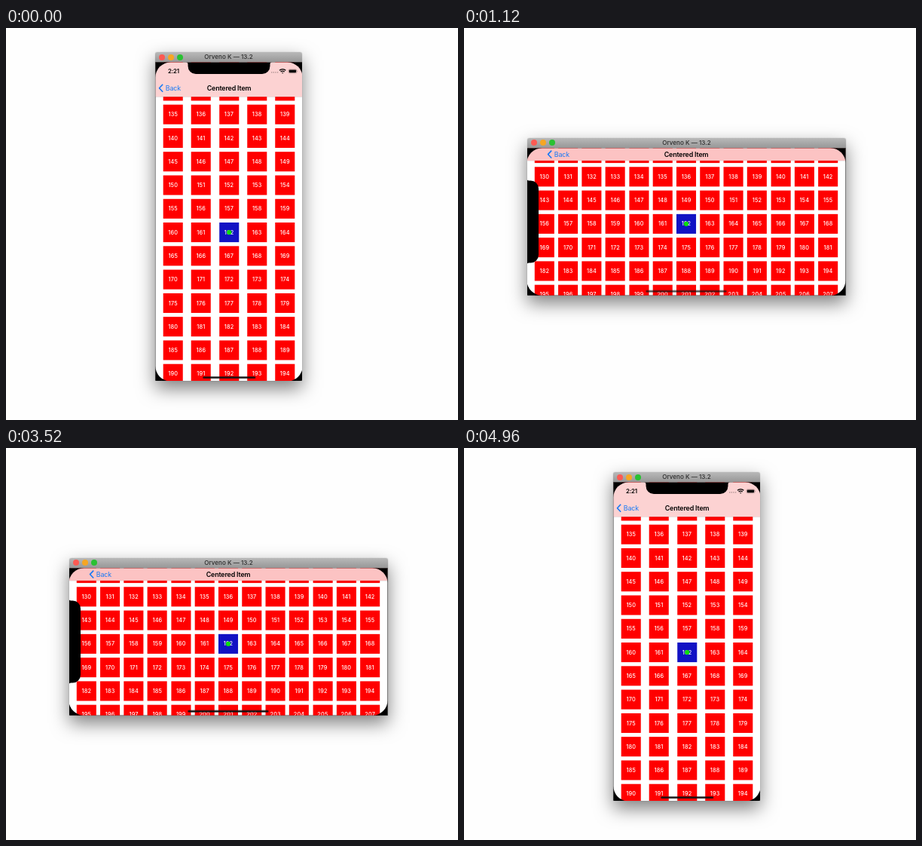
Write an HTML page that moves like this. It is 600 px wide and 520 px high and loops after 5 s.

```html
<!DOCTYPE html>
<html lang="en">
<head>
<meta charset="utf-8">
<title>Centered Item</title>
<style>
/* --f: window is landscape (0 or 1), --p: layout progress from tall to wide */
@property --f { syntax: "<number>"; inherits: true; initial-value: 0; }
@property --p { syntax: "<number>"; inherits: true; initial-value: 0; }

html, body { margin: 0; width: 100%; height: 100%; overflow: hidden; background: #fefefe; }
body { position: relative; font-family: Inter, Roboto, sans-serif; }

.win {
  --w: calc(195.5px + 227.8px * var(--f));
  --h: calc(423.3px - 227.8px * var(--f));
  position: absolute;
  left: calc(295.5px - var(--w) / 2);
  top: calc(243.4px - var(--h) / 2);
  width: var(--w);
  border-radius: 3px 3px 1px 1px;
  box-shadow: 0 10px 25px rgba(0, 0, 0, .5), 0 0 1px rgba(0, 0, 0, .4);
  animation: flip 5s step-end infinite, layout 5s ease-in-out infinite;
}
@keyframes flip {
  0% { --f: 0; }
  10.4% { --f: 1; }
  73.6%, 100% { --f: 0; }
}
@keyframes layout {
  0%, 12.28% { --p: 0; }
  18.28%, 75.69% { --p: 1; }
  81.69%, 100% { --p: 0; }
}

.bar {
  position: relative;
  height: 13.4px;
  border-radius: 3px 3px 0 0;
  background: linear-gradient(#b9b9b9, #979797);
  color: #2c2c2c;
  font-size: 8.1px;
  font-weight: 500;
  line-height: 13.6px;
  text-align: center;
}
.bar i {
  position: absolute;
  top: 2.8px;
  width: 8px;
  height: 8px;
  border-radius: 50%;
}

.screen {
  position: relative;
  height: var(--h);
  overflow: hidden;
  border-radius: 0 0 1px 1px;
  background: #000;
}
.page, .device { position: absolute; left: 50%; top: 50%; overflow: hidden; }
.page {
  width: calc(375px + 437px * var(--p));
  height: calc(812px - 437px * var(--p));
  background: #fff;
  transform: translate(-50%, -50%) rotate(calc((var(--p) - var(--f)) * 90deg)) scale(.5213);
}

.grid {
  position: absolute;
  left: 20px;
  top: -12px;
  display: grid;
  justify-content: space-between;
  row-gap: 10px;
}
.grid b {
  height: 50px;
  background: #f00;
  color: #fff;
  font: 500 14px/50px Inter, Roboto, sans-serif;
  letter-spacing: .3px;
  text-align: center;
}
.grid .mid { background: #1212c4; }
.tall { width: 335px; grid-template-columns: repeat(5, 50px); opacity: calc(1 - var(--p)); }
.wide { width: 772px; grid-template-columns: repeat(13, 50px); opacity: var(--p); }

.dot {
  position: absolute;
  left: 50%;
  top: calc(433px - 240px * var(--p));
  width: 12px;
  height: 12px;
  margin: -6px;
  border-radius: 50%;
  background: #0be00b;
}

/* The bar is lighter while the cells behind it cross-fade */
.nav {
  --tint: calc(210 - 15 * var(--p) + 70 * var(--p) * (1 - var(--p)));
  position: absolute;
  inset: 0 0 auto;
  height: calc(88px - 56px * var(--p));
  background: rgb(252, var(--tint), var(--tint));
  box-shadow: 0 1px 0 rgba(0, 0, 0, .15);
  font-size: 17px;
  letter-spacing: -.3px;
}
.row {
  position: absolute;
  inset: auto 0 0;
  height: calc(44px - 12px * var(--p));
  display: flex;
  align-items: center;
  justify-content: center;
  font-weight: 600;
}
.back {
  position: absolute;
  left: calc(8px + 44px * var(--p));
  display: flex;
  align-items: center;
  gap: 5px;
  color: #1478f6;
  font-weight: 400;
}
.back svg { display: block; }
.status {
  position: absolute;
  left: 0;
  top: 0;
  opacity: calc((1 - var(--f)) * (1 - var(--p)));
}

.device {
  width: 375px;
  height: 812px;
  transform: translate(-50%, -50%) rotate(calc(var(--f) * -90deg)) scale(.5213);
}
.device::before {
  content: "";
  position: absolute;
  inset: 0;
  border-radius: 39px;
  box-shadow: 0 0 0 60px #000;
}
.device svg { position: absolute; left: 0; top: 0; }
.home { position: absolute; border-radius: 3px; background: #111; }
.home.low { left: 120.5px; top: 799.5px; width: 134px; height: 5px; animation: low 5s linear infinite; }
.home.side { left: 8px; top: 303px; width: 5px; height: 206px; animation: side 5s linear infinite; }
@keyframes low {
  0%, 11.6% { opacity: 1; background: #111; }
  14.2% { opacity: 0; background: #bbb; }
  82.6% { opacity: 0; background: #111; }
  87%, 100% { opacity: 1; background: #111; }
}
@keyframes side {
  0%, 19.2% { opacity: 0; }
  23.6%, 74.6% { opacity: 1; }
  78%, 100% { opacity: 0; }
}
</style>
</head>
<body>
<div class="win">
  <div class="bar">
    <i style="left:5px;background:#fc5a53"></i>
    <i style="left:17.3px;background:#f6a623"></i>
    <i style="left:29.5px;background:#29c132"></i>
    Orveno K — 13.2
  </div>
  <div class="screen">
    <div class="page">
      <div class="grid tall"></div>
      <div class="grid wide"></div>
      <div class="dot"></div>
      <div class="nav">
        <svg class="status" width="375" height="44">
          <text x="46.5" y="28" font-size="15" font-weight="600" text-anchor="middle">2:21</text>
          <path d="M295 26h18" stroke="#000" stroke-opacity=".35" stroke-width="2.6" stroke-dasharray="2.6 2.4"/>
          <g fill="none" stroke="#000" stroke-width="2.4">
            <path d="M316 21a11.5 11.5 0 0 1 16 0M319 24.5a7 7 0 0 1 10 0"/>
            <path d="M321.5 26.5h5l-2.5 2.5z" fill="#000" stroke="none"/>
            <rect x="339" y="18" width="21" height="10" rx="3" stroke-opacity=".4" stroke-width="1"/>
          </g>
          <rect x="340.5" y="19.5" width="18" height="7" rx="1.6"/>
          <path d="M361.5 21.5q2 1.5 0 3.5z" fill-opacity=".5"/>
        </svg>
        <div class="row">
          <span class="back">
            <svg width="13" height="22"><path d="M11 1.5 2 11l9 9.5" fill="none" stroke="#1478f6" stroke-width="3"/></svg>
            Back
          </span>
          Centered Item
        </div>
      </div>
    </div>
    <div class="device">
      <svg width="375" height="40"><path d="M77 0q6 0 6 6v4a20 20 0 0 0 20 20h169a20 20 0 0 0 20-20v-4q0-6 6-6z"/></svg>
      <div class="home low"></div>
      <div class="home side"></div>
    </div>
  </div>
</div>
<script>
function fill(name, first, count) {
  const grid = document.querySelector(name);
  for (let n = first; n < first + count; n++) {
    const cell = document.createElement('b');
    cell.textContent = n;
    if (n === 162) cell.className = 'mid';
    grid.append(cell);
  }
}
fill('.tall', 125, 70);
fill('.wide', 117, 91);
</script>
</body>
</html>
```
